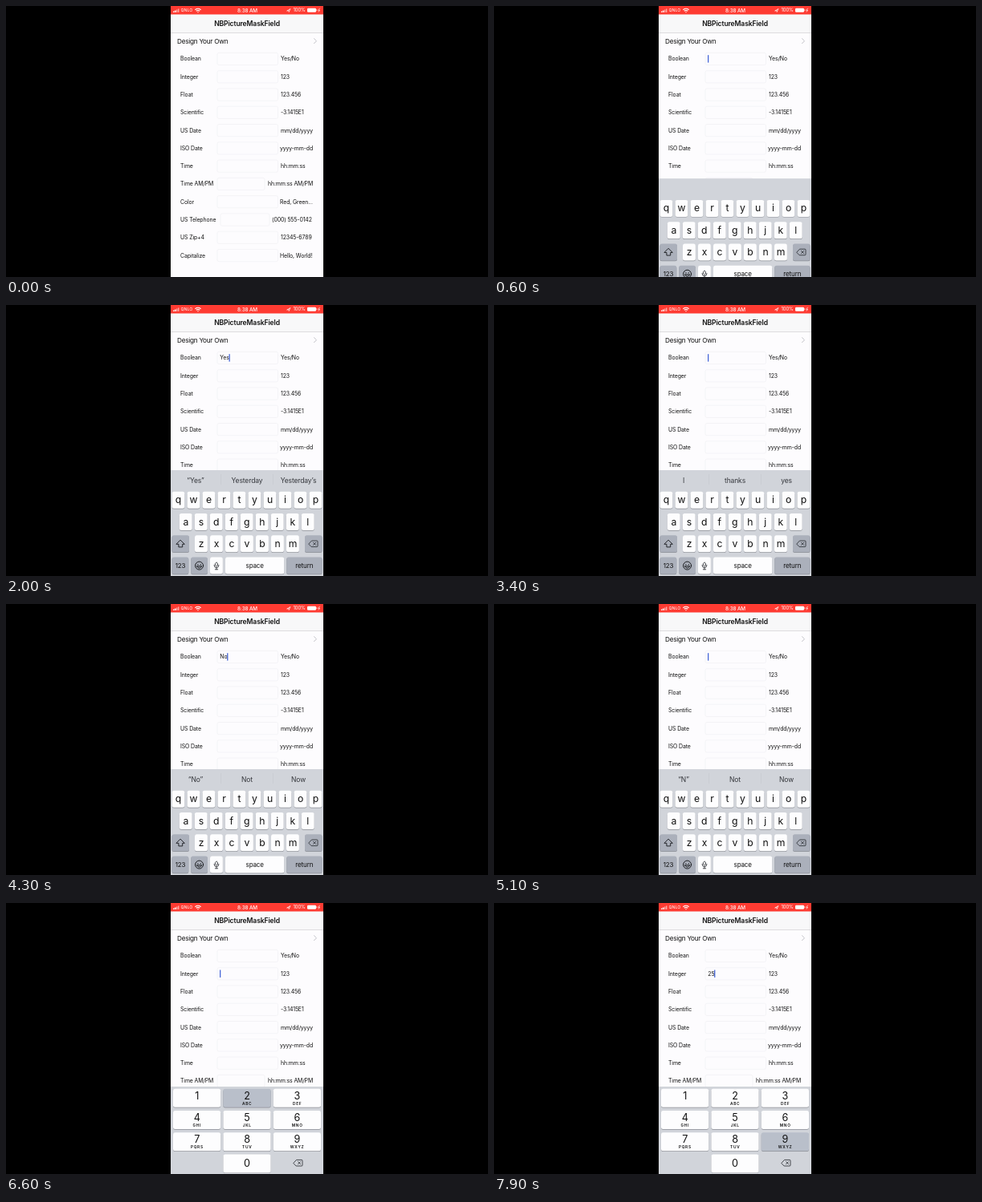
An HTML page with a canvas that plays this animation: 600x338 px, repeating every 8 s.

```html
<!DOCTYPE html>
<html lang="en">
<head>
<meta charset="utf-8">
<title>Mask field demo</title>
<style>
  html, body { margin: 0; width: 100%; height: 100%; overflow: hidden; background: #000; }
  canvas { display: block; width: 600px; height: 338px; }
</style>
</head>
<body>
<canvas id="stage"></canvas>
<script>
const LOOP = 8000;
const canvas = document.getElementById('stage');
const ratio = window.devicePixelRatio || 1;
canvas.width = 600 * ratio;
canvas.height = 338 * ratio;
const ctx = canvas.getContext('2d');

const ROW_TOP = 66, ROW_STEP = 22.28;
const INK = '#111', GREY_KEY = '#abb0bb', PANEL = '#d1d4da';

// label, example, x of example, left and right edge of the field
const rows = [
  ['Boolean', 'Yes/No', 342], ['Integer', '123', 342], ['Float', '123.456', 342],
  ['Scientific', '-3.1415E1', 342], ['US Date', 'mm/dd/yyyy', 342],
  ['ISO Date', 'yyyy-mm-dd', 341], ['Time', 'hh:mm:ss', 342],
  ['Time AM/PM', 'hh:mm:ss AM/PM', 326, 263, 322], ['Color', 'Red, Green...', 341],
  ['US Telephone', '(000) 555-0142', 331, 267, 328], ['US Zip+4', '12345-6789', 342],
  ['Capitalize', 'Hello, World!', 341]
];

// Each edit holds until the next: time, focused row, field text
const edits = [
  [400, 0, ''], [1500, 0, 'Yes'], [2900, 0, ''], [4000, 0, 'No'],
  [5000, 0, ''], [5500, 1, ''], [6700, 1, '2'], [7250, 1, '25']
];
const hints = [
  [0, []], [750, ['I', 'thanks', 'yes']], [1500, ['“Yes”', 'Yesterday', 'Yesterday’s']],
  [2950, ['I', 'thanks', 'yes']], [4000, ['“No”', 'Not', 'Now']],
  [5000, ['“N”', 'Not', 'Now']], [5200, ['I', 'thanks', 'yes']]
];
const presses = [[6500, 6700, 2], [7050, 7200, 5], [7800, 8000, 9]];

const latest = (list, t) => list.filter(item => item[0] <= t).pop();
const progress = (t, from, to) => Math.min(1, Math.max(0, (t - from) / (to - from)));

function text(str, x, y, size, { color = INK, weight = 400, align = 'left', spacing = -0.015 } = {}) {
  ctx.font = `${weight} ${size}px Inter, sans-serif`;
  ctx.letterSpacing = `${spacing * size}px`;
  ctx.textAlign = align;
  ctx.textBaseline = 'alphabetic';
  ctx.fillStyle = color;
  ctx.fillText(str, x, y + size * 0.36);
  return ctx.measureText(str).width;
}
const centered = (str, x, y, size, options) => text(str, x, y, size, { align: 'center', ...options });

function rect(x, y, w, h, color) {
  ctx.fillStyle = color;
  ctx.fillRect(x, y, w, h);
}

function rounded(x, y, w, h, r, color) {
  ctx.beginPath();
  ctx.roundRect(x, y, w, h, r);
  ctx.fillStyle = color;
  ctx.fill();
}

function stroke(path, x, y, color, width) {
  ctx.save();
  ctx.translate(x, y);
  ctx.strokeStyle = color;
  ctx.lineWidth = width;
  ctx.lineJoin = ctx.lineCap = 'round';
  ctx.stroke(new Path2D(path));
  ctx.restore();
}

function key(x, y, w, h, color = '#fdfdfe') {
  rounded(x, y + 0.7, w, h, 2.5, '#8d9097');
  rounded(x, y, w, h, 2.5, color);
}

function drawStatusBar() {
  rect(205, 0, 190, 10.5, '#fe3b32');
  for (let i = 0; i < 4; i++) rect(208 + i * 2, 6.5 - i, 1.4, 1.5 + i, i < 2 ? '#fff' : '#ffaaa5');
  text('QNLO', 217.5, 5.2, 5.3, { color: '#fff' });
  stroke('M-3.2-1.5Q0-4 3.2-1.5M-1.8 0Q0-1.4 1.8 0M0 1.7V1.8', 239, 6, '#fff', 1.2);
  centered('8:38 AM', 300.5, 5.3, 6.3, { color: '#fff', weight: 500 });
  stroke('M-2 .4L2-2 .2 2 0 .4Z', 352, 5.5, '#fff', 0.7);
  text('100%', 357.5, 5.2, 5.9, { color: '#fff' });
  rounded(375, 2.7, 11, 5, 1.2, '#fff');
  rect(386.5, 4.2, 0.8, 2, '#fff');
  stroke('M.6-2L-.8.3H.8L-.6 2', 389.7, 5.2, '#fff', 0.7);
}

function drawForm() {
  rect(205, 0, 190, 338, '#fdfcfe');
  rect(205, 10, 190, 23, '#f8f8f9');
  rect(205, 33, 190, 0.6, '#c9c9cc');
  drawStatusBar();
  centered('NBPictureMaskField', 300, 21.6, 8.6, { weight: 600 });
  text('Design Your Own', 213, 43.8, 8.2, { spacing: -0.03 });
  stroke('M-1.5-3L1.5 0-1.5 3', 385, 43.7, '#bcbcc2', 0.9);
  rows.forEach(([label, example, x, left = 263, right = 338.5], i) => {
    const y = ROW_TOP + i * ROW_STEP;
    text(label, 217, y, 6.9);
    text(example, x, y, 6.9);
    ctx.beginPath();
    ctx.roundRect(left, y - 7.6, right - left, 15.2, 2);
    ctx.strokeStyle = '#efeff1';
    ctx.lineWidth = 0.6;
    ctx.stroke();
  });
}

function drawField(t) {
  const edit = latest(edits, t);
  if (!edit) return;
  const [since, row, value] = edit;
  const y = ROW_TOP + row * ROW_STEP;
  const width = value ? text(value, 266.3, y, 6.9) : 0;
  if ((t - since) % 1000 < 700) rect(266 + width, y - 4.8, 1.3, 9.4, '#4868d8');
}

function drawBackspace(x, y) {
  stroke('M-5.5 0L-2-3.8H4.5Q5.5-3.8 5.5-2.8V2.8Q5.5 3.8 4.5 3.8H-2ZM0-1.6L3.2 1.6M3.2-1.6L0 1.6', x, y, '#24272c', 0.8);
}

function drawHints(t, top) {
  const words = latest(hints, t)[1];
  words.forEach((word, i) => centered(word, 236 + i * 64, top + 13.3, 8.5, { color: '#34363b' }));
  if (words.length) [267.5, 332].forEach(x => rect(x, top + 5, 0.5, 13, '#c3c6cd'));
}

function drawKeyboard(t, top) {
  rect(205, top, 190, 140, PANEL);
  drawHints(t, top);
  ['qwertyuiop', 'asdfghjkl', 'zxcvbnm'].forEach((letters, row) => {
    const left = [206.5, 215.8, 235][row];
    const y = top + 26.7 + row * 27.3;
    [...letters].forEach((letter, i) => {
      const x = left + i * 19;
      key(x, y, 15.9, 21);
      centered(letter, x + 7.95, y + 10.2, 12.2);
    });
  });

  const third = top + 81.3, fourth = top + 108.6;
  key(206.5, third, 21.5, 21, GREY_KEY);
  stroke('M0-4.5L5 .4H2.4V4H-2.4V.4H-5Z', 217.3, third + 10.6, '#17191c', 0.9);
  key(372, third, 21.5, 21, GREY_KEY);
  drawBackspace(382.5, third + 10.5);

  key(206.5, fourth, 20.8, 21, GREY_KEY);
  centered('123', 217, fourth + 10.6, 8);
  key(230.2, fourth, 20.8, 21, GREY_KEY);
  stroke('M5 0A5 5 0 1 1-5 0A5 5 0 1 1 5 0M-3 1Q0 5.4 3 1ZM-1.7-1.7V-1.2M1.7-1.7V-1.2', 240.6, fourth + 10.5, '#17191c', 1);
  key(254, fourth, 15.9, 21);
  stroke('M-1.4-3Q0-5.8 1.4-3V0Q0 2.3-1.4 0ZM-3-.8Q-3 2.6 0 2.6T3-.8M0 2.6V4.7M-1.7 4.7H1.7', 262, fourth + 10.5, '#24272c', 0.8);
  key(273, fourth, 73.3, 21);
  centered('space', 309.7, fourth + 10.3, 8);
  key(349.2, fourth, 44.3, 21, GREY_KEY);
  centered('return', 371.3, fourth + 10.3, 8);
}

function drawKeypad(t, top) {
  const press = presses.find(([from, to]) => t >= from && t < to);
  const letters = ['', 'ABC', 'DEF', 'GHI', 'JKL', 'MNO', 'PQRS', 'TUV', 'WXYZ'];
  rect(205, top, 190, 120, PANEL);
  for (let n = 1; n <= 10; n++) {
    const column = n === 10 ? 1 : (n - 1) % 3;
    const x = 208 + column * 62.4;
    const y = top + 2.8 + Math.floor((n - 1) / 3) * 27.2;
    key(x, y, 59.2, 23, press && press[2] === n ? '#b9bfca' : undefined);
    centered(String(n % 10), x + 29.6, y + (n === 10 ? 11.4 : 8.3), 12.6);
    if (n < 10) centered(letters[n - 1], x + 29.8, y + 18.4, 4.8, { weight: 600, spacing: 0.14 });
  }
  drawBackspace(363.5, top + 95.2);
}

function drawInput(t) {
  const rise = 1 - (1 - progress(t, 350, 750)) ** 2.7;
  const swap = progress(t, 5550, 5800);
  const top = 338 - 132 * rise + 23 * swap;
  if (swap < 1 && rise > 0) drawKeyboard(t, top);
  if (swap > 0) {
    ctx.globalAlpha = swap;
    drawKeypad(t, top);
    ctx.globalAlpha = 1;
  }
}

function draw(now) {
  const t = now % LOOP;
  ctx.setTransform(ratio, 0, 0, ratio, 0, 0);
  rect(0, 0, 600, 338, '#000');
  ctx.save();
  ctx.beginPath();
  ctx.rect(205, 0, 190, 338);
  ctx.clip();
  drawForm();
  drawField(t);
  drawInput(t);
  ctx.restore();
  requestAnimationFrame(draw);
}

const start = performance.now();
requestAnimationFrame(function first(now) { draw(Math.max(0, now - start)); });
</script>
</body>
</html>
```
